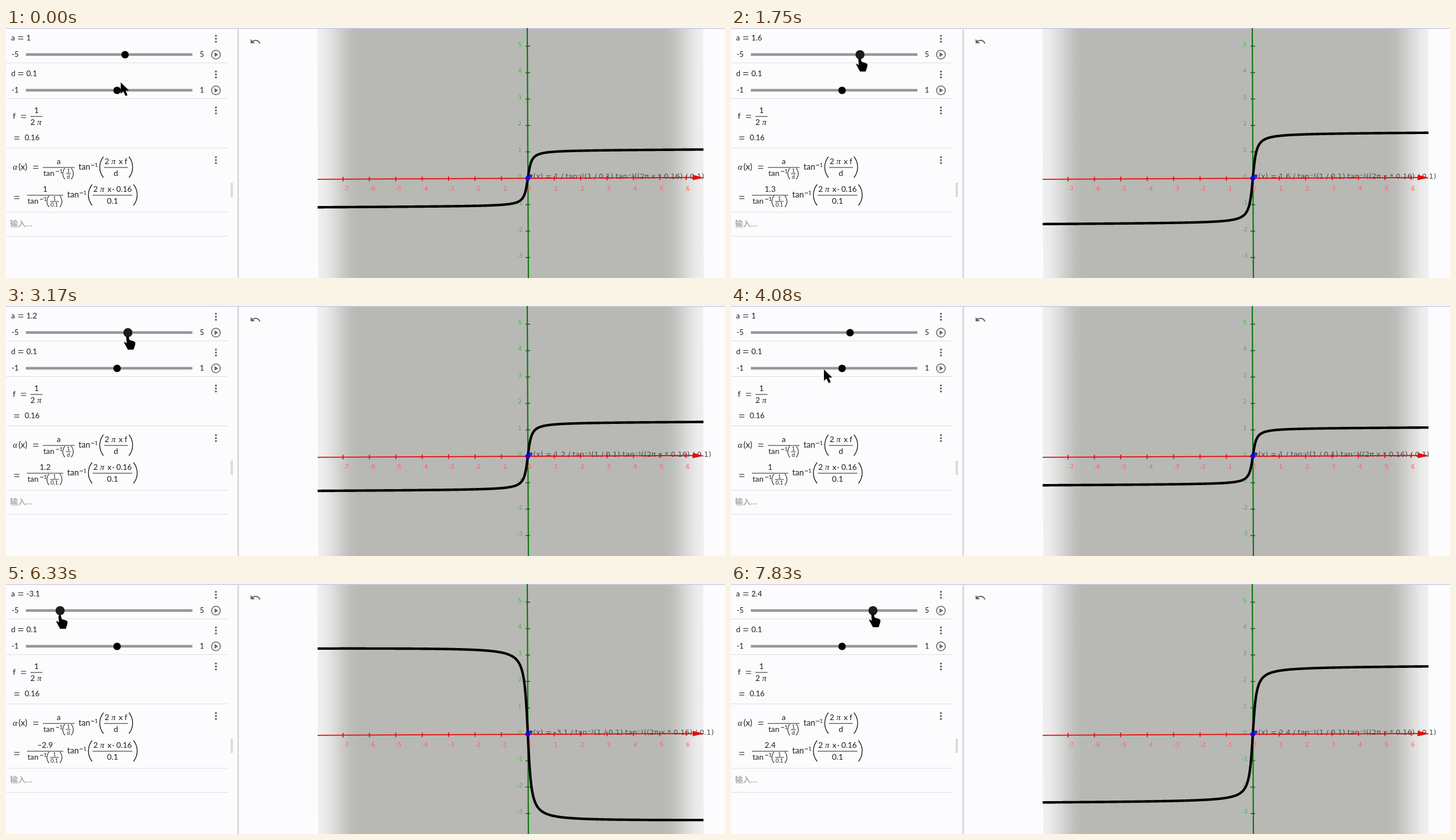
Recreate the animation shown at these times as an HTML page with a canvas. Size 1269 by 441 pixels, loop 8000 ms.

```html
<!DOCTYPE html>
<html lang="zh">
<head>
<meta charset="utf-8">
<style>
html, body { margin: 0; width: 100%; height: 100%; overflow: hidden; background: #fcfcfe; }
canvas { display: block; }
</style>
</head>
<body>
<canvas id="stage" width="1269" height="441"></canvas>
<script>
const g = document.getElementById('stage').getContext('2d');
const SANS = 'Lato, "Open Sans", sans-serif';
const GREEK = 'italic 15px "Liberation Serif", serif';
const PLOT = '"DejaVu Sans", sans-serif';
const INK = '#1c1c1c', GREY = '#666', RED = '#e60c0c', GREEN = '#0a780a';
const LOOP = 8000, STEP = 1000 / 12;
const ORIGIN = { x: 921, y: 265.1 }, UNIT = 46.6;

const smooth = u => u * u * (3 - 2 * u);
const settle = u => Math.sin(u * Math.PI / 2);
const clamp = u => Math.max(0, Math.min(1, u));

// Slider drags of a, in twelfths of a second.
const DRAGS = [
  { from: 13, to: 15, a: 1.1, ease: smooth },
  { from: 16, to: 25, a: 2, ease: smooth },
  { from: 27, to: 37, a: 1.2, ease: smooth },
  { from: 37, to: 42, a: 1, ease: smooth },
  { from: 53, to: 62, a: 0.9, ease: smooth },
  { from: 62, to: 77, a: -3.1, ease: settle },
  { from: 79, to: 93, a: 2.44, ease: smooth },
];
const dragged = k => DRAGS.reduce((a, d) => a + (d.a - a) * d.ease(clamp((k - d.from) / (d.to - d.from))), 1);
const valueAt = k => Math.round(dragged(k) * 10) / 10;
const knobX = (value, range) => 182 + 140.5 * value / range;

function text(s, x, y, font, color = INK, align = 'left') {
  g.font = typeof font === 'number' ? `${font}px ${SANS}` : font;
  g.fillStyle = color;
  g.textAlign = align;
  g.fillText(s, x, y);
}

function line(x1, y1, x2, y2, color = INK, width = 1) {
  g.strokeStyle = color;
  g.lineWidth = width;
  g.beginPath();
  g.moveTo(x1, y1);
  g.lineTo(x2, y2);
  g.stroke();
}

function rect(x, y, w, h, color) {
  g.fillStyle = color;
  g.fillRect(x, y, w, h);
}

function arc(x, y, r, from, to, color, width) {
  g.strokeStyle = color;
  g.lineWidth = width;
  g.beginPath();
  g.arc(x, y, r, from, to);
  g.stroke();
}

function disc(x, y, r, color) {
  g.fillStyle = color;
  g.beginPath();
  g.arc(x, y, r, 0, 7);
  g.fill();
}

function polygon(points, x, y, color) {
  g.fillStyle = color;
  g.beginPath();
  for (const [px, py] of points) g.lineTo(x + px, y + py);
  g.closePath();
  g.fill();
}

function equals(x, y, color = INK, width = 1) {
  for (const dy of [-2, 2]) line(x, y + dy, x + 9, y + dy, color, width);
}

function paren(x, top, bottom, depth) {
  const bend = (bottom - top) * .3;
  g.strokeStyle = INK;
  g.lineWidth = Math.abs(depth) > 5 ? 1.4 : 1.1;
  g.beginPath();
  g.moveTo(x, top);
  g.bezierCurveTo(x - depth * 1.25, top + bend, x - depth * 1.25, bottom - bend, x, bottom);
  g.stroke();
}

function inverseTan(x, y, size) {
  text('tan', x, y, size);
  line(x + 22, y - 8, x + 28, y - 8);
  text('1', x + 28.5, y - 5, 9.5);
}

function sliderRow(y, name, value, range, active) {
  const x = knobX(value, range);
  text(name, 9, y - 25, 13.5);
  equals(21.5, y - 29.5);
  text(String(Math.round(value * 10) / 10), 36, y - 25, 13.5);
  text(String(-range), 10, y + 4, 13);
  text(String(range), 342, y + 4, 13);
  rect(35, y - 2.5, 294, 4.6, '#979699');
  disc(x, y, active ? 8 : 6.6, active ? '#1d1d1a' : '#000');
  arc(370.5, y, 7.7, 0, 7, GREY, 1.6);
  polygon([[-2.3, -4], [4, 0], [-2.3, 4]], 370.5, y, GREY);
}

function fraction(left, right, y, top, bottom) {
  const mid = (left + right) / 2;
  text(top, mid, y - 6, 14, INK, 'center');
  line(left, y, right, y);
  text(bottom, mid, y + 14.5, 14, INK, 'center');
}

// num / atan(1/d) · atan(2πx… / d), with the first bar at height y.
function arctanFormula(left, right, y, num, d, dWidth, factor) {
  fraction(left, right, y, num, '');
  inverseTan(left + 1, y + 15, 13.6);
  const center = left + 41 + dWidth / 2;
  paren(left + 39, y + 1, y + 21, 4);
  text('1', center, y + 8.5, 9, INK, 'center');
  line(center - dWidth / 2, y + 11, center + dWidth / 2, y + 11);
  text(d, center, y + 20, 9.5, INK, 'center');
  paren(right - 6, y + 1, y + 21, -4);

  const x = right + 51, width = factor.length > 1 ? 70 : 42;
  inverseTan(right + 7, y + 4, 14.6);
  paren(x, y - 19, y + 18, 7);
  fraction(x + 1, x + 1 + width, y, '', d);
  text('2', x + 2, y - 6, 14);
  text('π', x + 14, y - 6, GREEK);
  text('x', x + 27, y - 6, 14);
  text(factor, x + width, y - 6, 13.8, INK, 'right');
  paren(x + width + 3, y - 19, y + 18, -7);
}

function drawPanel(k, active) {
  for (const y of [61.5, 124.5, 211.5, 325, 367.5]) line(0, y, 392, y, '#dedee0');
  for (const y of [19, 82, 145.5, 233])
    for (const dy of [-5.3, 0, 5.3]) disc(370.5, y + dy, 1.8, GREY);
  sliderRow(47, 'a', dragged(k), 5, active);
  sliderRow(110, 'd', 0.1, 1, false);

  text('f', 12, 160, 14);
  equals(26.5, 156);
  fraction(43, 64.5, 156, '1', '');
  text('2', 43, 170.5, 14);
  text('π', 55, 170.5, GREEK);
  equals(14.5, 194, GREY, 1.6);
  text('0.16', 33, 198, 13.3);

  text('α', 12, 250, GREEK);
  text('(x)', 22, 250, 15);
  equals(48, 245.5);
  arctanFormula(65, 121, 246, 'a', 'd', 8, 'f');
  // The evaluated formula trails the slider by two steps.
  const shown = String(valueAt(Math.max(0, k - 2))).replace('-', '−');
  equals(14.5, 299, GREY, 1.6);
  arctanFormula(37, 101, 295, shown, '0.1', 15, '· 0.16');

  text('输入...', 7, 350, '14px "Noto Sans CJK SC", "Noto Sans CJK", sans-serif', '#8a8a8a');
  rect(396.5, 273, 4, 25, '#d9d9db');
  rect(408, 0, 1, 441, '#e9e9eb');
  rect(409, 0, 2, 441, '#d3d3d6');
}

function drawUndo() {
  arc(440.5, 29.5, 7.8, -2.4, -.25, GREY, 2);
  polygon([[0, 0], [0, 7.5], [7.5, 7.5]], 431.7, 19.5, GREY);
}

const axisY = x => ORIGIN.y - (x - ORIGIN.x) * .0048;

function drawPlot(a) {
  const fade = g.createLinearGradient(550, 0, 1232, 0);
  for (let i = 0; i <= 5; i++) {
    const shade = 240 - 56 * smooth(i / 5);
    const color = `rgb(${shade}, ${shade}, ${shade - 3 * i / 5})`;
    fade.addColorStop(i * .021, color);
    fade.addColorStop(1 - i * .021, color);
  }
  polygon([[0, 0], [681, 0], [682, 441], [1.5, 441]], 549.5, 0, fade);
  rect(0, 0, 1269, 1.4, '#cbc6e8');

  line(920, 0, 922, 441, GREEN, 2.2);
  for (let n = -7; n <= 6; n++)
    text(String(n), ORIGIN.x + UNIT * n + (n < 0 ? 5 : 3), 286.5, `10.2px ${PLOT}`, '#ff6060', 'center');
  for (let n = -3; n <= 5; n++) {
    const y = ORIGIN.y - UNIT * n;
    text(String(n), 907, y + .5, `10.2px ${PLOT}`, '#42bb42', 'center');
    if (n) line(917, y, 925, y, GREEN, 1.8);
  }

  g.strokeStyle = '#000';
  g.lineWidth = 4.4;
  g.lineJoin = 'round';
  g.beginPath();
  for (let x = 550; x <= 1231; x++) {
    const u = (x - ORIGIN.x) / UNIT;
    g.lineTo(x, axisY(x) - UNIT * a * Math.atan(u / .1) / Math.atan(10));
  }
  g.stroke();

  text(`α(x) = ${a} / tan⁻¹(1 / 0.1) tan⁻¹((2π x * 0.16) / 0.1)`, 922, 265.5, `12.85px ${PLOT}`, '#4c4c4c');

  line(550, axisY(550), 1216, axisY(1216), RED, 1.9);
  for (let n = -7; n <= 6; n++) {
    const x = ORIGIN.x + UNIT * n;
    if (n) line(x, axisY(x) - 4, x, axisY(x) + 4, RED, 1.8);
  }
  polygon([[0, -5], [20, 0], [0, 4.5]], 1212, 264, RED);
  disc(921, 265, 4.4, '#0808d8');
  disc(926, 261, 2.8, '#2a2ac8');
}

const ARROW = [[0, 0], [0, 20], [4.5, 16], [8.5, 24], [12, 22.3], [8.5, 14.5], [14.5, 14]];
const HAND = [[-1, 0], [2, 0], [4, 7], [11, 9], [14, 11], [14, 15], [11, 24], [1, 24],
  [-6, 11], [-4, 10.5], [-1, 13], [-2, 2]];

// Approach to the knob first, later one round trip past the lower slider.
function arrowAt(k) {
  if (k < 5) return [202.5 + 7 * k / 5, 96 - 43 * smooth(k / 5)];
  const angle = -Math.PI / 4 - 2 * Math.PI * (k - 44) / 8;
  return [164 + 42 * Math.cos(angle), 76.3 + 35.7 * Math.sin(angle)];
}

function draw(t) {
  const k = Math.min(94, Math.floor((t + 4) / STEP));
  const dragging = k >= 4 && k < 45 || k >= 52;
  const a = dragged(k);
  rect(0, 0, 1269, 441, '#fcfcfe');
  drawPlot(valueAt(k));
  drawPanel(k, dragging);
  drawUndo();
  if (dragging) polygon(HAND, knobX(a, 5) - 1, 53.5 - a / 2, '#000');
  else polygon(ARROW, ...arrowAt(k), '#000');
}

const start = performance.now();
function tick() {
  draw((performance.now() - start) % LOOP);
  requestAnimationFrame(tick);
}
tick();
</script>
</body>
</html>
```
